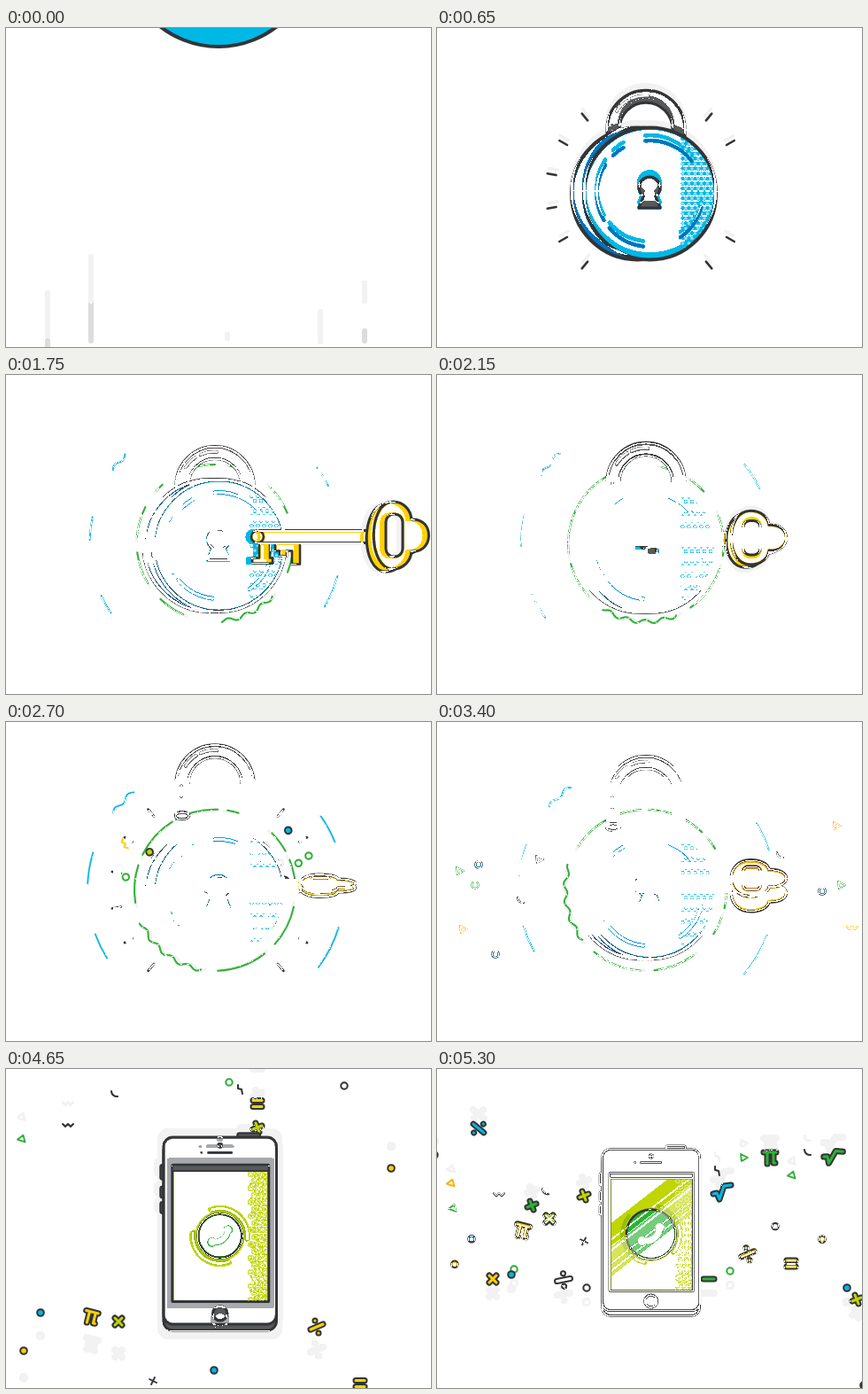
An HTML page with a canvas for the animation above (5350 ms loop, 480x360 px).

```html
<!DOCTYPE html>
<html lang="en">
<head>
<meta charset="utf-8">
<title>Unlock</title>
<style>
html, body { margin: 0; width: 100%; height: 100%; overflow: hidden; background: #fff; }
canvas { display: block; width: 480px; height: 360px; }
</style>
</head>
<body>
<canvas id="stage" width="480" height="360"></canvas>
<script>
const W = 480, H = 360, LOOP = 5350, STEP = 50;
const INK = '#333436', PAPER = '#f2f2f2', CYAN = '#00b8e6', BLUE = '#0075bd',
  GREEN = '#2eb135', LIME = '#bfd600', YELLOW = '#ffd200', ORANGE = '#ffb000', GREY = '#58595b';
const TAU = Math.PI * 2, rad = d => d * Math.PI / 180;
const layer = () => {
  const c = document.createElement('canvas');
  c.width = W; c.height = H;
  return c.getContext('2d', { willReadFrequently: true });
};
const now = layer(), before = layer();
const stage = document.getElementById('stage').getContext('2d');
let g = now;

// Smooth curve through time/value pairs
function curve(t, ...k) {
  const n = k.length / 2, T = i => k[2 * i], V = i => k[2 * i + 1];
  if (t <= T(0)) return V(0);
  if (t >= T(n - 1)) return V(n - 1);
  let i = 0;
  while (t > T(i + 1)) i++;
  const slope = j => {
    const a = Math.max(j - 1, 0), b = Math.min(j + 1, n - 1);
    return (V(b) - V(a)) / (T(b) - T(a));
  };
  const d = T(i + 1) - T(i), u = (t - T(i)) / d, u2 = u * u, u3 = u2 * u;
  return (2 * u3 - 3 * u2 + 1) * V(i) + (u3 - 2 * u2 + u) * d * slope(i)
    + (3 * u2 - 2 * u3) * V(i + 1) + (u3 - u2) * d * slope(i + 1);
}

function paint(fill, line, width = 3.5) {
  if (fill) { g.fillStyle = fill; g.fill(); }
  if (line) { g.strokeStyle = line; g.lineWidth = width; g.stroke(); }
}
function oval(x, y, rx, ry, ...style) {
  g.beginPath(); g.ellipse(x, y, rx, ry, 0, 0, TAU); paint(...style);
}
const disc = (x, y, r, ...style) => oval(x, y, r, r, ...style);
function box(x, y, w, h, r, ...style) {
  g.beginPath(); g.roundRect(x, y, w, h, r); paint(...style);
}
function trace(points, closed) {
  points.forEach(([x, y], i) => i ? g.lineTo(x, y) : g.moveTo(x, y));
  if (closed) g.closePath();
}
function poly(points, closed, ...style) {
  g.beginPath(); trace(points, closed); paint(...style);
}
function arc(x, y, r, from, to, color, width) {
  g.beginPath(); g.arc(x, y, r, rad(from), rad(to)); paint(null, color, width);
}
function wavyArc(x, y, r, from, to, color, width) {
  const pts = [];
  for (let a = from; a <= to; a++) {
    const q = r + 2.2 * Math.sin((a - from) * r / 190);
    pts.push([x + q * Math.cos(rad(a)), y + q * Math.sin(rad(a))]);
  }
  poly(pts, false, null, color, width);
}
function at(x, y, draw) {
  g.save(); g.translate(x, y); draw(); g.restore();
}

const fall = t => t < 3620 ? 0 : .075 * ((t - 3620) / 50) ** 3;
const lockY = t => curve(t, -50, -117, 0, -86, 100, 15, 200, 150, 300, 212, 400, 200, 500, 172,
  600, 181, 650, 187, 750, 193, 900, 189, 1100, 191, 1400, 194, 1750, 192.5, 2200, 193)
  + (t > 1800 ? .4 * Math.sin(t / 150) : 0) + fall(t);

function streaks(t) {
  const drop = (t + 50) * 1.08;
  for (const [x, y, len] of [[47, 299, 48], [96, 258, 50], [250, 346, 4], [355, 320, 34], [405, 288, 20]])
    poly([[x, y + drop], [x, y + drop + Math.max(len - drop / 6, 3)]], false, null, '#dcdcdc', 6);
}

function rings(t, y) {
  const grow = curve(t, 1300, 0, 1900, 1), turn = (t - 2700) * .06;
  const r = curve(t, 1300, 89, 2550, 88, 2700, 91, 2850, 92.5, 3200, 91);
  const cx = 236, cy = y - 3;
  [[171, 198], [206, 238], [241, 272], [279, 287], [315, 331], [338, 351], [12, 42], [52, 88]]
    .forEach(([a, b]) => arc(cx, cy, r, a + turn, a + turn + (b - a) * grow, GREEN, 2));
  wavyArc(cx, cy, r, 100 + turn, 100 + turn + 56 * grow, GREEN, 2);
  const sway = 4 * Math.sin((t - 2700) / 350), R = r + 54;
  [[183, 197], [148, 160], [325, 338], [17, 37]]
    .forEach(([a, b]) => arc(cx + 1, cy, R, a + sway, a + sway + (b - a) * grow, CYAN, 1.7));
  wavyArc(cx + 1, cy, R, 217 + sway, 217 + sway + 13 * grow, CYAN, 1.7);
}

function ticks(t, y) {
  const first = t >= 500 && t < 1250, second = t >= 2350 && t < 2950;
  if (!first && !second) return;
  const r = first ? 104 + (t - 650) * .03 : 109 + (t - 2700) * .03;
  for (const a of [130, 150, 170, 190, 210, 230, -50, -30, 30, 50]) {
    const c = Math.cos(rad(a)), s = Math.sin(rad(a));
    poly([[237 + c * r, y - 3 + s * r], [237 + c * (r + 10), y - 3 + s * (r + 10)]], false, null, INK, 2.5);
  }
}

function shackle(t, y) {
  const lift = curve(t, 350, 0, 500, -78, 600, -73, 2150, -73, 2400, -112, 2600, -121, 2700, -123,
    2800, -124, 3100, -112, 3600, -110);
  at(236, y + lift, () => {
    const hook = () => {
      g.beginPath();
      g.moveTo(-37, 36); g.lineTo(-37, 0);
      g.arc(0, 0, 37, Math.PI, 0);
      g.lineTo(37, 75);
    };
    g.lineCap = 'butt';
    hook(); paint(null, INK, 17);
    hook(); paint(null, GREY, 11);
    oval(-37, 36, 8, 4, GREY, INK, 2.5);
    g.lineCap = 'round';
    arc(-1, 0, 38, 212, 238, '#fff', 2.5);
    arc(-1, 0, 38, 246, 275, '#fff', 2.5);
    poly([[-38, 2], [-38, 14]], false, null, '#fff', 2.5);
  });
}

function keyhole(y, s) {
  at(240, y - 7, () => {
    g.scale(s, s);
    g.beginPath();
    g.arc(0, 0, 12, rad(125), rad(55));
    g.lineTo(12, 23); g.lineTo(-12, 23); g.closePath();
    paint(GREY, INK, 3);
  });
}

function lock(t, y) {
  const r = curve(t, 0, 107, 150, 86, 300, 75, 350, 74.5), open = curve(t, 320, 0, 500, 1);
  const x = 240 + open * .5;
  const shift = open * curve(t, 650, 14, 1200, 10.5);
  if (open > 0) {
    shackle(t, y);
    disc(x - shift, y, r, BLUE, INK, 4);
  }
  disc(x, y, r, CYAN, INK, 4);
  if (open <= 0) return;
  g.save();
  g.globalAlpha = Math.min(open, 1);
  g.beginPath(); g.arc(x, y, r - 2, 0, TAU); g.clip();
  g.fillStyle = '#8fe0f3';
  for (let row = -12; row <= 12; row++)
    for (let col = 0; col < 6; col++) {
      g.beginPath();
      g.arc(x + 37 + col * 7 + (row & 1) * 3.5, y + row * 5.6, 1.8, 0, TAU);
      g.fill();
    }
  [[97, 140], [150, 213], [226, 240], [265, 322], [15, 55]]
    .forEach(([a, b]) => arc(x, y, 60, a, b, BLUE, 4));
  g.restore();
  keyhole(y, open);
}

function headShape(sy) {
  g.beginPath();
  g.moveTo(153, -38 * sy);
  g.bezierCurveTo(165, -38 * sy, 173, -29 * sy, 174, -18 * sy);
  g.bezierCurveTo(200, -20 * sy, 200, 20 * sy, 174, 18 * sy);
  g.bezierCurveTo(173, 29 * sy, 165, 38 * sy, 153, 38 * sy);
  g.bezierCurveTo(124, 38 * sy, 124, -38 * sy, 153, -38 * sy);
  g.closePath();
}

function key(t, y) {
  if (t < 650) return;
  const x = curve(t, 650, 520, 850, 350, 1000, 292, 1200, 282, 1600, 276, 1700, 279, 1750, 284,
    1800, 286, 1900, 215, 1960, 201);
  const sy = curve(t, 2050, 1, 2400, .35, 2700, .27, 3000, .4, 3500, .58);
  const depth = curve(t, 2050, 3, 2700, 5, 3500, 19), back = curve(t, 2050, -8, 2400, 0);
  const turned = t > 2200, teeth = curve(t, 1950, 1, 2250, 0);
  g.save();
  g.beginPath(); g.rect(224, 0, 400, 800); g.clip();
  g.translate(x, y + curve(t, 1750, -10, 1950, -8));
  if (teeth > 0.02) {
    g.save(); g.scale(1, teeth);
    poly([[2, 6], [14, 6], [14, 24], [17, 24], [17, 30], [-6, 30], [-6, 24], [2, 24]], true, YELLOW, INK, 2.5);
    poly([[20, 6], [48, 6], [48, 31], [39, 31], [39, 16], [33, 16], [33, 22], [25, 22], [25, 16], [20, 16]],
      true, YELLOW, INK, 2.5);
    g.restore();
  }
  box(turned ? 24 : 0, -7, turned ? 108 : 130, 14, 3, YELLOW, INK, 3);
  if (!turned) disc(0, 0, 7, YELLOW, INK, 2.5);
  at(back, depth / 2, () => { headShape(sy); paint(YELLOW, INK, 3); });
  at(0, -depth / 2, () => {
    headShape(sy); paint(turned ? ORANGE : YELLOW, INK, 3);
    box(145, -24 * sy, 19, 48 * sy, 9 * sy, turned ? '#f7931e' : PAPER, INK, 3);
  });
  g.restore();
}

const TRI = [[-4, -4], [4, 0], [-3, 4]];
const shapes = {
  dot: c => disc(0, 0, 3.8, c, INK, 2),
  ring: c => disc(0, 0, 3.7, null, c, 2),
  tri: c => poly(TRI, true, null, c, 1.8),
  wave: c => poly([[-6, -1], [-3, 2], [0, -1], [3, 2], [6, -1]], false, null, c, 2),
  zig: c => poly([[-3, -5], [-3, -1], [1, 0], [2, 5]], false, null, c, 2),
  bend: c => { g.beginPath(); g.arc(3, -3, 6, rad(80), rad(180)); paint(null, c, 2); },
  nib: c => poly([[-4, -2], [4, 2], [0, 0], [2, -4], [-2, 4]], false, null, c, 1.8)
};
// Outlined math signs: strokes, then optional dots
const signs = {
  plus: [[[-5, 2], [5, -2]], [[-2, -5], [2, 5]]],
  times: [[[-4, -4], [4, 4]], [[4, -4], [-4, 4]]],
  minus: [[[-6, 0], [6, 0]]],
  equal: [[[-5, -3.5], [5, -3.5]], [[-5, 3.5], [5, 3.5]]],
  pi: [[[-7, -6], [7, -6]], [[-3, -6], [-3, 7]], [[4, -6], [4, 6], [6, 6]]],
  root: [[[-10, 2], [-6, 1], [-3, 8], [2, -7], [10, -8]]],
  over: [[[-7, 3], [7, -3]], [[-2, -7], [-2, -7]], [[2, 7], [2, 7]]]
};
function shape(kind, color, x, y, tilt = 0) {
  at(x, y, () => {
    g.rotate(tilt);
    if (shapes[kind]) return shapes[kind](color);
    for (const [c, w] of [[INK, 7], [color, 3]]) {
      g.beginPath();
      signs[kind].forEach(s => trace(s));
      paint(null, c, w);
    }
  });
}

// kind, colour, resting place, 1 when it leaves first
const confetti = [
  ['dot', CYAN, 47, 161], ['dot', CYAN, 66, 262], ['dot', CYAN, 414, 88, 1], ['dot', CYAN, 435, 191],
  ['dot', LIME, 75, 141, 1], ['dot', LIME, 406, 210, 1], ['ring', GREEN, 43, 184], ['ring', GREEN, 17, 202, 1],
  ['ring', GREEN, 464, 150, 1], ['ring', GREEN, 439, 168, 1], ['tri', GREEN, 26, 168], ['tri', GREEN, 457, 184],
  ['tri', ORANGE, 30, 234], ['tri', ORANGE, 452, 117], ['tri', INK, 116, 155], ['wave', YELLOW, 14, 121, 1],
  ['wave', YELLOW, 469, 232], ['bend', INK, 94, 201], ['bend', INK, 387, 150]
];
function burst(t) {
  if (t < 2560) return;
  for (const [kind, color, x, y, first] of confetti) {
    const u = Math.min(Math.max((t - (first ? 2560 : 2660)) / 750, 0), 1), p = 1 - (1 - u) ** 3;
    const hop = -18 * Math.sin(Math.PI * p);
    shape(kind, color, 237 + (x - 237) * p, 185 + (y - 185) * p + hop + fall(t), (1 - p) * 2);
  }
}

// kind, colour, x, y, distance still to go at 4650 ms
const early = [
  ['pi', YELLOW, 96, 179, 101, .25], ['times', LIME, 127, 165, 120], ['dot', CYAN, 39, 189, 86],
  ['dot', YELLOW, 20, 217, 101], ['tri', GREEN, 17, 160, -81, 3], ['wave', INK, 70, 144, -81],
  ['bend', INK, 122, 142, -114], ['nib', INK, 166, 189, 163], ['ring', INK, 382, 183, -164],
  ['over', YELLOW, 351, 206, 85], ['equal', YELLOW, 400, 215, 140], ['dot', YELLOW, 435, 195, -83],
  ['equal', YELLOW, 284, 180, -141], ['plus', LIME, 284, 190, -124], ['ring', GREEN, 252, 170, -155],
  ['zig', INK, 265, 170, -147], ['dot', CYAN, 235, 200, 140]
];
// kind, colour, x, y, direction of travel
const late = [
  ['over', CYAN, 47, 67, 1, 1.1], ['tri', ORANGE, 15, 129, 1, 3], ['plus', GREEN, 107, 154, 1],
  ['plus', LIME, 166, 143, 1], ['times', YELLOW, 63, 237, -1], ['ring', GREEN, 87, 226, -1],
  ['dot', CYAN, 84, 232, -1], ['over', '#fff', 143, 238, -1, .2], ['ring', INK, 169, 247, -1],
  ['pi', GREEN, 376, 100, 1], ['root', CYAN, 322, 139, 1], ['root', GREEN, 447, 99, 1, .2],
  ['tri', GREEN, 347, 100, 1], ['tri', GREEN, 400, 120, 1, 3], ['bend', INK, 418, 94, 1],
  ['zig', INK, 317, 115, 1], ['dot', CYAN, 463, 247, -1], ['plus', LIME, 474, 260, -1],
  ['ring', GREEN, 331, 228, -1], ['minus', GREEN, 307, 237, -1], ['dot', INK, 482, 357, -1],
  ['dot', INK, -3, 97, 1]
];
function mathRain(t) {
  const rest = Math.exp((4650 - t) / 190), ahead = (t - 5300) / STEP * 16;
  for (const [kind, color, x, y, d, tilt] of early) shape(kind, color, x, y + d * rest, tilt);
  for (const [kind, color, x, y, dir, tilt] of late) shape(kind, color, x, y + dir * ahead, tilt);
}

function phone(t) {
  const s = curve(t, 4380, 0, 4480, .95, 4550, 1.33, 4600, 1.25, 4650, 1.16, 4750, 1.03,
    4850, .98, 5000, 1.015, 5300, 1, 5350, .997);
  const r = curve(t, 4600, 21, 4650, 21.5, 4900, 25, 5150, 28.5, 5300, 28, 5350, 27.5);
  if (s < .02) return;
  g.save();
  g.translate(241.7, curve(t, 4650, 186, 4900, 184.5));
  g.scale(s, s);
  for (const [y, h] of [[-67, 14], [-46, 11], [-31, 11]]) box(-58, y, 6, h, 2, GREY, INK, 2);
  box(17, -98, 22, 6, 2, GREY, INK, 2);
  box(-55, -89, 110, 183, 9, GREY, INK, 2.5);
  box(-55, -94, 110, 182, 9, '#a7a9ac', INK, 2.5);
  disc(0, -86, 2, GREY, INK, 1.5);
  disc(-18, -79, 1, INK);
  poly([[-11, -79], [11, -79]], false, null, INK, 2.5);
  disc(0, 77.5, 7, GREY, INK, 2.5);
  box(-46.5, -67, 94, 133, 1, LIME, INK, 2.5);
  g.save();
  g.beginPath(); g.rect(-45, -61, 91, 126); g.clip();
  for (let row = 0; row < 19; row++)
    for (let col = 0; col < 3; col++)
      disc(30 + col * 7 + (row & 1) * 3.5, -58 + row * 6.8, 2.2, null, '#dfe97a', 1.2);
  for (const a of [200, 20]) arc(0, 2, r + 4.5, a + t / 20, a + t / 20 + 115, '#93bd00', 4);
  disc(0, 2, r, GREEN, INK, 2.5);
  at(0, 2, () => {
    g.scale(r / 25, r / 25);
    g.rotate(-.65);
    arc(0, -9, 14, 35, 145, '#fff', 6);
    disc(-11, 0, 4.5, '#fff');
    disc(11, 0, 4.5, '#fff');
  });
  const glide = (t - 5300) * .3;
  g.globalAlpha = .35;
  for (const [d, w] of [[-6, 13], [8, 4], [16, 3]])
    poly([[-90 + glide, 66 + d + glide], [90 + glide, -74 + d + glide]], false, null, '#fff', w);
  g.restore();
  box(-46.5, -67, 94, 6, 1, GREY, INK, 1.5);
  g.restore();
}

function scene(ctx, t) {
  g = ctx;
  g.fillStyle = PAPER;
  g.fillRect(0, 0, W, H);
  g.lineCap = g.lineJoin = 'round';
  if (t < 300) streaks(t);
  if (t < 4500) {
    const y = lockY(t);
    if (t >= 1300) rings(t, y);
    ticks(t, y);
    burst(t);
    lock(t, y);
    key(t, y);
  }
  if (t >= 4380) {
    mathRain(t);
    phone(t);
  }
  return g.getImageData(0, 0, W, H);
}

// Only what moved since the previous step is inked; the rest stays white
function show(t) {
  const image = scene(now, t), a = image.data, b = scene(before, t - STEP).data;
  for (let i = 0; i < a.length; i += 4) {
    const change = Math.abs(a[i] - b[i]) + Math.abs(a[i + 1] - b[i + 1]) + Math.abs(a[i + 2] - b[i + 2]);
    if (change < 15) a[i] = a[i + 1] = a[i + 2] = 255;
  }
  stage.putImageData(image, 0, 0);
}

const start = performance.now();
let shown = -1;
function tick() {
  const step = Math.floor((performance.now() - start) % LOOP / STEP);
  if (step !== shown) show((shown = step) * STEP);
  requestAnimationFrame(tick);
}
tick();
</script>
</body>
</html>
```
